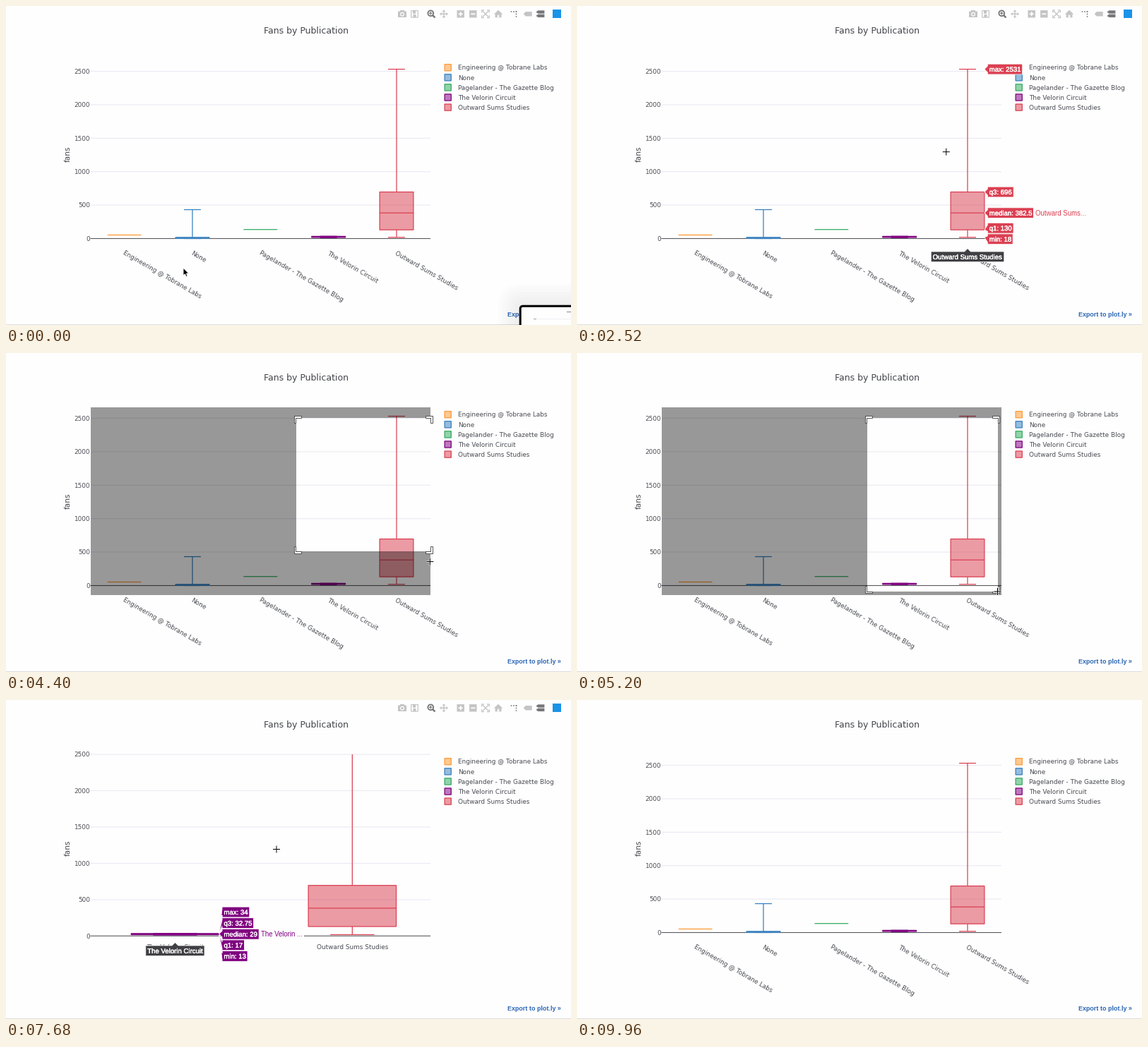
A matplotlib script that plays this animation: 800 by 452 pixels, repeating every 10 s.

```python
import numpy as np
import matplotlib.pyplot as plt
from matplotlib.animation import FuncAnimation
from matplotlib.lines import Line2D
from matplotlib.patches import Circle, FancyBboxPatch, PathPatch, Polygon, Rectangle
from matplotlib.path import Path
from matplotlib.patheffects import withStroke
from matplotlib.text import Text
from matplotlib.transforms import Affine2D

W, H, DPI = 800, 452, 64
PT = 72 / DPI  # points per pixel
STEP, LOOP = 40, 10000
LEFT, RIGHT, TOP, BOTTOM = 119.5, 601, 76.5, 343
STROKE = 1.25

WHITE, INK, GRID, AXIS = "#fefefe", "#4b4d54", "#eaeaf3", "#5a5a60"
IDLE, ACTIVE = "#c4c4c6", "#77777a"
SANS = "Liberation Sans"

# name, colour, (max, q3, median, q1, min)
BOXES = [
    ("Engineering @ Tobrane Labs", "#ff9933", (53,)),
    ("None", "#3780bf", (432, 18, 5, 1, 0)),
    ("Pagelander - The Gazette Blog", "#32ab60", (135,)),
    ("The Velorin Circuit", "#800080", (34, 32.75, 29, 17, 13)),
    ("Outward Sums Studies", "#db4052", (2531, 696, 382.5, 130, 18)),
]
STATS = ("max", "q3", "median", "q1", "min")

# moments of the story
SLIDE, DRAG, ZOOM, CLICK, RESET, LEAVE = 1080, 4000, 5280, 8240, 8400, 9640
LAG = 120  # hover labels trail the cursor
DRAG_FROM, DRAG_TO = (410.6, 92), (595.5, 337.5)

# cursor stops: time, (x, y)
STOPS = [
    (0, (251, 371)), (500, (170, 290)), (1160, (185, 285)), (1600, (478, 273)),
    (2200, (556, 240)), (3600, DRAG_FROM), (DRAG, DRAG_FROM), (4360, (602, 281)),
    (4520, DRAG_TO), (ZOOM, DRAG_TO), (6000, (495, 277)), (7300, (310, 205)),
    (7680, (383, 211)), (RESET, (390, 214)), (LEAVE, (385, 470)),
]

fig = plt.figure(figsize=(W / DPI, H / DPI), dpi=DPI, facecolor=WHITE)
ax = fig.add_axes([0, 0, 1, 1])
ax.set(xlim=(0, W), ylim=(H, 0))
ax.axis("off")


def add(artist, group=None):
    """Artists share one z-order, so they paint in the order they are added."""
    artist.set_zorder(1)
    ax.add_artist(artist)
    if group is not None:
        group.append(artist)
    return artist


def line(xs, ys, color, width=1, group=None, snap=False, **kw):
    return add(Line2D(xs, ys, color=color, lw=width * PT, snap=snap,
                      solid_capstyle="butt", **kw), group)


def hline(x0, x1, y, *args, **kw):
    return line([x0, x1], [y, y], *args, **kw)


def vline(x, y0, y1, *args, **kw):
    return line([x, x], [y0, y1], *args, **kw)


def rect(x0, y0, x1, y1, color, group=None, edge="none", width=0):
    return add(Rectangle((x0, y0), x1 - x0, y1 - y0, facecolor=color, snap=False,
                         edgecolor=edge, lw=width * PT), group)


def square(x, y, r, color, *args):
    return rect(x - r, y - r, x + r, y + r, color, *args)


def disc(x, y, r, color, group):
    return add(Circle((x, y), r, color=color, lw=0), group)


def poly(points, color, group=None, edge="none", width=0, **kw):
    return add(Polygon(points, closed=True, facecolor=color, edgecolor=edge,
                       lw=width * PT, **kw), group)


def text(x, mid, s, size=8.9, color=INK, group=None, **kw):
    return add(Text(x, mid + 0.36 * size, s, color=color, fontsize=size * PT,
                    **kw), group)


def tag_text(x, mid, s, group, **kw):
    """White label text, slightly thickened."""
    bold = [withStroke(linewidth=0.35 * PT, foreground="white")]
    return text(x, mid, s, 9.6, "white", group, fontfamily=SANS,
                path_effects=bold, **kw)


def width_of(label):
    return label.get_window_extent().width


def soft(color):
    return tuple(int(color[i:i + 2], 16) / 255 for i in (1, 3, 5)) + (0.52,)


def show(group, on):
    for artist in group:
        artist.set_visible(on)


def ramp(t, start, length):
    return min(max((t - start) / length, 0), 1)


def spread(ys, gap):
    """Push neighbours apart until they are at least one gap away."""
    ys = list(ys)
    for _ in range(80):
        for i in range(len(ys) - 1):
            push = max(0, (gap - ys[i + 1] + ys[i]) / 2)
            ys[i] -= push
            ys[i + 1] += push
    return ys


class View:
    """Axis mapping plus the artists that depend on it."""

    def __init__(self, x0, dx, y0, dy, shown, slanted):
        self.x0, self.dx, self.y0, self.dy = x0, dx, y0, dy
        self.shown, self.half = shown, 0.248 * dx
        self.artists, self.hovers = [], {}
        self.draw_axes(slanted)
        for i in shown:
            self.draw_box(i)

    def x(self, i):
        return self.x0 + self.dx * i

    def y(self, value):
        return self.y0 - self.dy * value

    def draw_axes(self, slanted):
        g = self.artists
        for v in range(0, 2501, 500):
            hline(LEFT, RIGHT, self.y(v), GRID if v else AXIS, 1.1, g)
            text(118.8, self.y(v), str(v), group=g, ha="right")
        for i in self.shown:
            if slanted:
                text(self.x(i) - 2.6, 348.4, BOXES[i][0], group=g, rotation=-30,
                     rotation_mode="anchor")
            else:
                text(self.x(i), 349.8, BOXES[i][0], group=g, ha="center")

    def draw_box(self, i):
        _, color, stats = BOXES[i]
        x, half, parts = self.x(i), self.half, []
        style = (color, STROKE, parts)
        if len(stats) == 1:
            hline(x - half, x + half, self.y(stats[0]), *style)
        else:
            top, q3, mid, q1, low = map(self.y, stats)
            rect(x - half, q3, x + half, q1, soft(color), parts, color, STROKE)
            hline(x - half, x + half, mid, *style)
            for end, side in ((top, q3), (low, q1)):
                vline(x, side, end, *style)
                hline(x - half / 2, x + half / 2, end, *style)
        for artist in parts:
            artist.set_clip_path(plot_area)
        self.artists += parts

    def draw_hover(self, i):
        name, color, stats = BOXES[i]
        g = self.hovers[i] = []
        x, tip, a, b = self.x(i), self.x(i) + self.half, 4.4, 7.4
        # category label under the axis
        back = poly([(x, 343.6)], "#404044", g, WHITE, 0.7)
        w = width_of(tag_text(x, 355.4, name, g, ha="center")) / 2 + 2.4
        back.set_xy([(x, 343.6), (x + a, 348), (x + w, 348), (x + w, 362.6),
                     (x - w, 362.6), (x - w, 348), (x - a, 348)])
        # one tag per statistic
        keys = STATS if len(stats) > 1 else ("median",)
        ends = [max(self.y(v), TOP) for v in stats]
        for key, v, end, mid in zip(keys, stats, ends, spread(ends, 15.6)):
            back = poly([(tip, end)], color, g, WHITE, 0.8)
            label = tag_text(tip + a + 2.4, mid, f"{key}: {v}", g)
            left, right = tip + a, tip + a + width_of(label) + 4.6
            back.set_xy([(tip, end), (left, mid + a), (left, mid + b),
                         (right, mid + b), (right, mid - b), (left, mid - b),
                         (left, mid - a)])
            if key == "median":
                back = rect(right, mid - b, right, mid + b, WHITE, g)
                trace = name if len(name) < 15 else name[:12] + "..."
                note = text(right + 2.6, mid, trace, 9.6, color, g, fontfamily=SANS)
                back.set_width(width_of(note) + 5)


def zoom_view(view, shown):
    """The view after the dragged rectangle is stretched over the plot."""
    (l, t), (r, b) = DRAG_FROM, DRAG_TO
    kx, ky = (RIGHT - LEFT) / (r - l), (BOTTOM - TOP) / (b - t)
    return View(LEFT + (view.x0 - l) * kx, view.dx * kx,
                TOP + (view.y0 - t) * ky, view.dy * ky, shown, False)


def draw_modebar():
    g, y = [], 11.3

    def tag(x, mid, h, color):
        poly([(x, mid), (x + 3, mid - h), (x + 12, mid - h), (x + 12, mid + h),
              (x + 3, mid + h)], color, g)

    # camera
    rect(555, 7.5, 567, 16, IDLE, g)
    rect(558, 6, 564, 8, IDLE, g)
    disc(561, y + 0.4, 3, WHITE, g)
    disc(561, y + 0.4, 1.7, IDLE, g)
    # disk
    square(578.5, y, 4.8, WHITE, g, IDLE, 1.2)
    square(578, y - 2.5, 2, IDLE, g)
    square(578.5, y + 2.7, 2, IDLE, g)
    # magnifier
    line([602, 607.5], [11, 16.5], ACTIVE, 2.4, g)
    disc(601.3, y - 1, 4.8, ACTIVE, g)
    disc(601.3, y - 1, 3, WHITE, g)
    hline(599, 603.6, y - 1, ACTIVE, 1.2, g)
    vline(601.3, y - 3.3, y + 1.3, ACTIVE, 1.2, g)
    # pan and autoscale
    for turn in range(4):
        c, s = np.cos(turn * np.pi / 2), np.sin(turn * np.pi / 2)
        spin = np.array([[c, s], [-s, c]])
        poly([(620, y)] + np.array([(6, 0), (3.4, 2.4), (3.4, -2.4)]) @ spin
             if False else np.array([(6, 0), (3.4, 2.4), (3.4, -2.4)]) @ spin
             + (620, y), IDLE, g)
        line([620, 620 + 4 * c], [y, y + 4 * s], IDLE, 1.4, g)
        corner_mark = np.array([(2, 5.3), (5.3, 5.3), (5.3, 2)]) @ spin + (679, y)
        line(*corner_mark.T, IDLE, 1.3, g)
        line([679, 679 + 4 * (c - s)], [y, y + 4 * (c + s)], IDLE, 1.3, g)
    # zoom in, zoom out
    for x in (643.7, 661.3):
        square(x, y, 5.2, IDLE, g)
        hline(x - 3, x + 3, y, WHITE, 1.8, g)
    vline(643.7, y - 3, y + 3, WHITE, 1.8, g)
    # home
    poly([(697, y - 5.5), (703.2, y + 0.4), (690.8, y + 0.4)], IDLE, g)
    rect(692.6, y, 701.4, y + 5, IDLE, g)
    rect(695.7, y + 1.5, 698.3, y + 5, WHITE, g)
    # spike lines
    for k in range(3):
        square(715.5 + 3.5 * k, 8, 0.8, ACTIVE, g)
        square(722.5, 8 + 3.5 * k, 0.8, ACTIVE, g)
    # hover tags
    tag(732.7, y, 3.2, IDLE)
    tag(750.4, y - 2.8, 2.2, ACTIVE)
    tag(750.4, y + 2.6, 2.2, ACTIVE)
    square(780, 11, 6, "#1a93e8", g)
    return g


def draw_thumbnail():
    g, move = [], Affine2D()
    kw = {"transform": move + ax.transData}

    def card(pad, **style):
        add(FancyBboxPatch((732, 429), 160, 120, boxstyle=f"round,pad={pad}",
                           **style, **kw), g)

    for pad in range(36, 4, -4):
        card(pad, color="black", alpha=0.008, lw=0)
    card(3.8, facecolor=WHITE, edgecolor="black", lw=3 * PT)
    hline(794, 820, 433.5, "#8a8a90", 1, g, **kw)
    hline(747, 751, 443.5, "#a5a5aa", 1, g, **kw)
    hline(752, 850, 443.5, "#f0f0f4", 1, g, **kw)
    return g, move


def draw_pointers():
    move = Affine2D()
    kw = {"transform": move + ax.transData}
    arrow, cross = [], []
    poly([(0, 0), (0, 11), (2.5, 8.8), (4.1, 12.5), (6, 11.7), (4.4, 8), (7.8, 8)],
         "black", arrow, "white", 0.9, **kw)
    for color, width, r in (("#ffffffaa", 2.6, 5.5), ("black", 1, 5)):
        hline(-r, r, 0, color, width, cross, **kw)
        vline(0, -r, r, color, width, cross, **kw)
    return arrow, cross, move


def corner(x, y, ox, oy, near=0.4, far=2.6, arm=7.4):
    bracket = [(far, -arm), (near, -arm), (near, near), (-arm, near),
               (-arm, far), (far, far)]
    return [(x + ox * a, y + oy * b) for a, b in bracket]


def box_path(l, t, r, b):
    return [(l, t), (r, t), (r, b), (l, b), (l, t)]


plot_area = Rectangle((LEFT, TOP), RIGHT - LEFT, BOTTOM - TOP,
                      transform=ax.transData)
full = View(167.6, 96.35, 329.5, 0.0948, range(5), True)
zoomed = zoom_view(full, (3, 4))

text(425.2, 34.8, "Fans by Publication", 12.5, "#44464c", ha="center")
add(Text(87.6, 209.3, "fans", color="#44464c", fontsize=10.5 * PT, rotation=90,
         ha="center", va="center"))
for row, (name, color, _) in enumerate(BOXES):
    mid = 87.2 + 14.1 * row
    square(625.7, mid, 4.6, soft(color), None, color, STROKE)
    text(640.3, mid, name)
text(710, 437, "Export to plot.ly »", 8.9, "#2c66b4", fontweight="bold",
     fontfamily=SANS)
hline(0, W, 451.5, "#dcdcde")
modebar = draw_modebar()

shade = add(PathPatch(Path(box_path(0, 0, 1, 1)), color="black", lw=0))
corners = [poly([(0, 0)], "white", edge="#444444", width=0.9) for _ in range(4)]
for view in (full, zoomed):
    for i in view.shown:
        view.draw_hover(i)
thumb, thumb_move = draw_thumbnail()
arrow, cross, pointer_move = draw_pointers()


def cursor_at(t):
    times, spots = zip(*STOPS)
    return [np.interp(t, times, axis) for axis in zip(*spots)]


def in_plot(x, y):
    return LEFT < x < RIGHT and TOP < y < BOTTOM


def update_selection(t):
    on = DRAG + STEP < t < ZOOM
    show([shade] + corners, on)
    if not on:
        return
    l, top = DRAG_FROM
    r, b = np.minimum(cursor_at(t - STEP), (RIGHT, BOTTOM))
    outer = box_path(LEFT, TOP, RIGHT, BOTTOM)
    hole = box_path(l, top, r, b)[::-1]
    codes = [Path.MOVETO] + [Path.LINETO] * 3 + [Path.CLOSEPOLY]
    shade.set_path(Path(outer + hole, codes * 2))
    shade.set_alpha(0.4 * ramp(t, DRAG, 200))
    spots = [(x, y, ox, oy) for x, ox in ((l, -1), (r, 1))
             for y, oy in ((top, -1), (b, 1))]
    for shape, spot in zip(corners, spots):
        shape.set_xy(corner(*spot))


def update_hover(t, view):
    x, y = cursor_at(t - LAG)
    busy = DRAG <= t < ZOOM + LAG or CLICK <= t < RESET + LAG
    near = None
    if not busy and in_plot(x, y):
        near = min(view.shown, key=lambda i: abs(view.x(i) - x))
    for v in (full, zoomed):
        for i, group in v.hovers.items():
            show(group, v is view and i == near)


def draw(n):
    t = n * STEP
    view = zoomed if ZOOM <= t < RESET else full
    show(full.artists, view is full)
    show(zoomed.artists, view is zoomed)
    update_hover(t, view)
    update_selection(t)

    x, y = cursor_at(t)
    inside = DRAG <= t < ZOOM or in_plot(x, y)
    show(cross, inside)
    show(arrow, not inside and y < H)
    pointer_move.clear().translate(x, y + 0.5 * inside)

    fade = 1 - ramp(t, DRAG, 280) + ramp(t, ZOOM, 280) - ramp(t, LEAVE, 280)
    for artist in modebar:
        artist.set_alpha(fade)

    slide = ramp(t, SLIDE, 400)
    show(thumb, slide < 1)
    thumb_move.clear().translate(115 * slide ** 2, 0)


anim = FuncAnimation(fig, draw, frames=LOOP // STEP, interval=STEP, repeat=True,
                     repeat_delay=0, blit=False)
plt.show()
```
